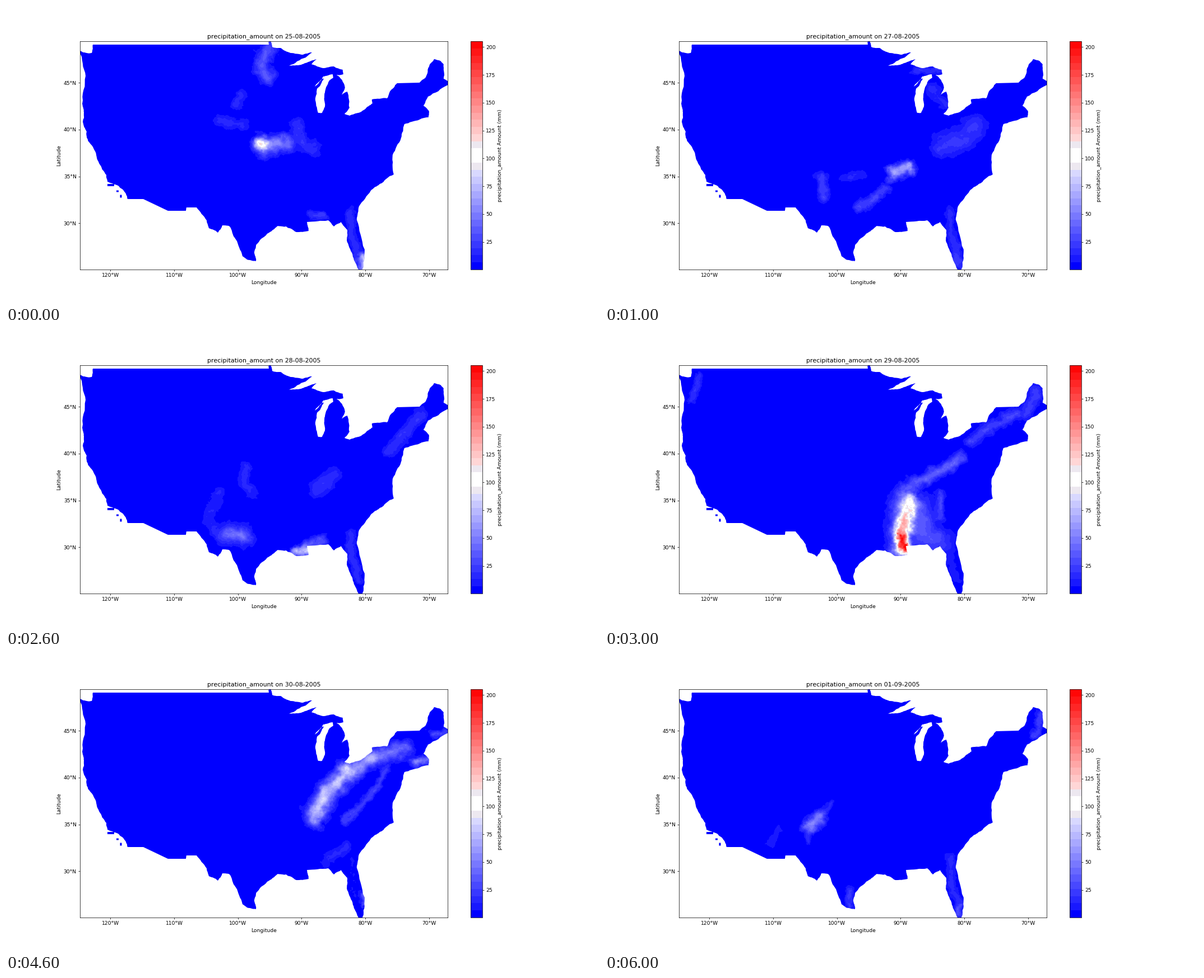
Recreate the animation shown at these times as a matplotlib script. Size 1058 px wide and 529 px high, loop 7000 ms.

```python
import matplotlib.pyplot as plt
import numpy as np
from matplotlib.animation import FuncAnimation
from matplotlib.colors import ListedColormap, Normalize
from matplotlib.path import Path

# Map coordinates are stage pixels, y pointing down.
LEFT, RIGHT, TOP, BOTTOM = 132.25, 788.46, 63.48, 470.81
WEST, EAST, SOUTH, NORTH = -124.767, -67.058, 25.067, 49.4
COLS, ROWS = 656, 407
X, Y = np.meshgrid(np.linspace(LEFT, RIGHT, COLS), np.linspace(TOP, BOTTOM, ROWS))

# Key points of the shores; straight borders join one shore to the next.
PACIFIC = [
    (217, 345), (213, 334), (200, 321), (181, 314), (179, 302), (166, 281),
    (158, 258), (144, 235), (144, 225), (137, 207), (139, 190), (136, 175),
    (142, 125), (132, 80), (144, 84), (153, 84), (155, 69),
]
GREAT_LAKES = [
    (469, 69), (469, 63), (473, 63), (475, 73), (490, 75), (508, 84),
    (530, 87), (546, 83), (535, 92), (505, 107), (521, 106), (534, 102),
    (554, 95), (545, 104), (566, 111), (585, 108), (601, 114), (602, 122),
    (590, 123), (602, 137), (605, 145), (599, 159), (609, 153), (613, 182),
    (604, 193), (613, 196), (640, 185), (654, 174), (653, 167), (680, 165),
    (685, 153), (698, 138),
]
ATLANTIC = [
    (738, 137), (748, 129), (756, 105), (764, 95), (775, 98), (781, 104),
    (781, 130), (789, 135), (789, 141), (753, 162), (745, 178), (755, 188),
    (754, 199), (738, 203), (711, 211), (705, 236), (690, 266), (692, 301),
    (667, 318), (651, 330), (630, 358), (626, 382), (640, 435), (638, 466),
    (636, 471),
]
GULF = [
    (629, 471), (619, 448), (609, 422), (609, 400), (598, 386), (585, 394),
    (575, 383), (537, 386), (540, 402), (518, 404), (500, 394), (485, 393),
    (466, 407), (447, 426), (443, 440), (446, 456), (430, 453), (422, 447),
    (410, 417), (398, 393), (386, 392), (378, 405), (362, 397), (358, 383),
    (340, 360),
]
BORDER = [(322, 360), (321, 366), (289, 366), (245, 345)]
LAKE = [
    (583, 122), (566, 126), (551, 144), (564, 130), (567, 130), (555, 148),
    (552, 165), (557, 191), (564, 191), (569, 180), (568, 168), (570, 150),
    (578, 132), (584, 128),
]
ISLANDS = [(187, 320, 12, 4), (199, 331, 4, 3), (205, 340, 3, 5)]

# Storms: peak millimetres, width, then the track of the rain band.
AUG_25 = [
    (34, 10, (470, 78), (456, 103), (466, 126)),
    (14, 8, (418, 160), (412, 178)),
    (14, 9, (385, 205), (425, 214)),
    (85, 9, (453, 246), (458, 250)),
    (52, 11, (458, 250), (498, 246)),
    (18, 9, (518, 210), (528, 242), (552, 256)),
    (20, 6, (545, 373), (566, 378)),
    (75, 6, (638, 450), (637, 466)),
]
AUG_27 = [
    (20, 6, (555, 115), (600, 115)),
    (14, 9, (580, 148), (607, 174)),
    (21, 16, (605, 250), (642, 238), (660, 216)),
    (62, 8, (515, 301), (540, 288)),
    (26, 7, (455, 360), (475, 348), (500, 328)),
    (24, 8, (386, 308), (392, 338)),
    (13, 6, (425, 308), (458, 302)),
    (24, 7, (625, 448), (632, 460)),
]
AUG_28 = [
    (18, 9, (738, 150), (715, 185), (685, 218)),
    (14, 8, (427, 245), (425, 275), (440, 290)),
    (16, 12, (555, 285), (585, 260)),
    (13, 9, (380, 290), (362, 340), (385, 375)),
    (43, 13, (400, 365), (420, 366)),
    (80, 7, (522, 397), (540, 393)),
    (28, 7, (540, 382), (567, 378)),
]
AUG_29 = [
    (120, 10, (548, 307), (534, 345), (531, 390)),
    (150, 7, (531, 372), (531, 386)),
    (50, 17, (536, 310), (530, 392)),
    (32, 18, (562, 320), (572, 370), (590, 378)),
    (36, 8, (540, 281), (595, 255), (635, 230)),
    (26, 6, (598, 295), (597, 335)),
    (26, 8, (655, 200), (677, 180), (735, 150)),
    (22, 9, (755, 148), (772, 110)),
    (18, 6, (169, 82), (155, 125)),
]
AUG_30 = [
    (72, 12, (552, 288), (575, 246), (610, 212)),
    (55, 11, (615, 210), (652, 186)),
    (42, 11, (655, 184), (710, 170)),
    (24, 5, (600, 300), (625, 282), (662, 238), (678, 205)),
    (45, 6, (730, 195), (752, 190)),
    (26, 6, (762, 146), (785, 140)),
    (14, 9, (575, 370), (605, 345)),
    (38, 4, (638, 432), (638, 448)),
]
AUG_31 = [
    (66, 8, (690, 155), (728, 146)),
    (36, 11, (665, 195), (690, 166)),
    (28, 9, (655, 172), (745, 150)),
    (36, 9, (752, 142), (772, 106)),
    (13, 11, (600, 228), (640, 208)),
    (26, 5, (537, 355), (543, 355)),
    (23, 9, (560, 374), (590, 356)),
]
SEP_01 = [
    (24, 6, (777, 110), (770, 146)),
    (50, 8, (362, 306), (383, 292)),
    (16, 6, (385, 288), (401, 266)),
    (18, 5, (362, 320), (361, 332)),
    (12, 5, (295, 340), (308, 312)),
    (20, 6, (436, 422), (440, 450)),
    (32, 5, (634, 455), (634, 466)),
]
PENINSULA = (618, 368), (617, 410), (630, 445)
DAYS = [
    ("25-08-2005", 16, AUG_25), ("27-08-2005", 16, AUG_27),
    ("28-08-2005", 16, AUG_28), ("29-08-2005", 9, AUG_29),
    ("30-08-2005", 7, AUG_30), ("31-08-2005", 17, AUG_31),
    ("01-09-2005", 15, SEP_01),
]


def value_noise(rng, size):
    """Smooth noise in -1..1 with features of the given pixel size."""
    knots = rng.uniform(-1, 1, (ROWS // size + 3, COLS // size + 3))
    u, v = (X - LEFT) / size, (Y - TOP) / size
    i, j = u.astype(int), v.astype(int)
    u, v = (t * t * (3 - 2 * t) for t in (u - i, v - j))
    upper = knots[j, i] * (1 - u) + knots[j, i + 1] * u
    lower = knots[j + 1, i] * (1 - u) + knots[j + 1, i + 1] * u
    return upper * (1 - v) + lower * v


def fractal(rng):
    return sum(weight * value_noise(rng, size)
               for weight, size in ((0.5, 14), (0.3, 7), (0.2, 3)))


def track_distance(track, px, py):
    """Distance from every point to the nearest leg of a track."""
    nearest = np.full_like(px, np.inf)
    for (x0, y0), (x1, y1) in zip(track, track[1:]):
        dx, dy = x1 - x0, y1 - y0
        t = np.clip(((px - x0) * dx + (py - y0) * dy) / (dx * dx + dy * dy), 0, 1)
        nearest = np.minimum(nearest, np.hypot(px - x0 - t * dx, py - y0 - t * dy))
    return nearest


def rain_field(day, storms):
    rng = np.random.default_rng(day)
    px, py = X + 8 * fractal(rng), Y + 8 * fractal(rng)
    field = np.zeros_like(X)
    for amount, width, *track in storms:
        rain = amount * np.exp(-(track_distance(track, px, py) / width) ** 2 / 2)
        field = np.hypot(field, rain)
    return field * (1 + 0.3 * fractal(rng))


def roughen(points, rng):
    """Split each leg at displaced midpoints until the shore looks ragged."""
    points = np.array(points, float)
    for _ in range(3):
        a, b = points[:-1], points[1:]
        step = b - a
        length = np.hypot(*step.T)[:, None]
        shift = np.minimum(0.08 * length, 1.2) * rng.uniform(-1, 1, length.shape)
        middle = (a + b) / 2 + step[:, ::-1] * (-1, 1) / length * shift
        points = np.vstack([np.stack([a, middle], 1).reshape(-1, 2), points[-1:]])
    return points


def ring(points):
    return Path(np.vstack([points, points[:1]]), closed=True)


def box(x, y, w, h):
    return [(x + sx * w / 2, y + sy * h / 2)
            for sx, sy in ((-1, -1), (1, -1), (1, 1), (-1, 1))]


def rain_colors():
    colors = plt.get_cmap("bwr")((np.arange(32) + 0.5) / 32)
    colors[0, :3] = 0, 0, 1
    colors[[14, 17], :3] = 0.93, 0.91, 0.94
    colors[15:17, :3] = 1
    return ListedColormap(colors)


def lon_x(lon):
    return LEFT + (lon - WEST) / (EAST - WEST) * (RIGHT - LEFT)


def lat_y(lat):
    return BOTTOM - (lat - SOUTH) / (NORTH - SOUTH) * (BOTTOM - TOP)


plt.rcParams["font.family"] = "DejaVu Sans"
fig, ax = plt.subplots(figsize=(16, 8), dpi=66.125)
fields = [rain_field(day, storms + [(drizzle, 7, *PENINSULA)])
          for day, (_, drizzle, storms) in enumerate(DAYS)]

rain_map = ax.imshow(fields[0], cmap=rain_colors(), norm=Normalize(0.3, 205),
                     extent=(LEFT, RIGHT, BOTTOM, TOP), aspect="auto",
                     interpolation="nearest")
shore_rng = np.random.default_rng(5)
shores = [roughen(s, shore_rng) for s in (PACIFIC, GREAT_LAKES, ATLANTIC, GULF)]
outlines = [np.vstack(shores + [BORDER])] + [box(*island) for island in ISLANDS]
land = Path.make_compound_path(*map(ring, outlines))
rain_map.set_clip_path(land, transform=ax.transData)
ax.fill(*roughen(LAKE, shore_rng).T, color="white", linewidth=0)

ax.set_xlim(LEFT, RIGHT)
ax.set_ylim(BOTTOM, TOP)
lons, lats = range(-120, -69, 10), range(30, 46, 5)
ax.set_xticks([lon_x(v) for v in lons], [f"{-v}°W" for v in lons])
ax.set_yticks([lat_y(v) for v in lats], [f"{v}°N" for v in lats])
ax.set_xlabel("Longitude")
ax.set_ylabel("Latitude")
title = ax.set_title("", pad=7)
fig.colorbar(rain_map, ax=ax, ticks=range(25, 201, 25),
             label="precipitation_amount Amount (mm)")


def update(frame):
    rain_map.set_data(fields[frame])
    title.set_text(f"precipitation_amount on {DAYS[frame][0]}")
    return rain_map, title


anim = FuncAnimation(fig, update, frames=len(DAYS), interval=1000,
                     repeat=True, repeat_delay=0)
plt.show()
```
